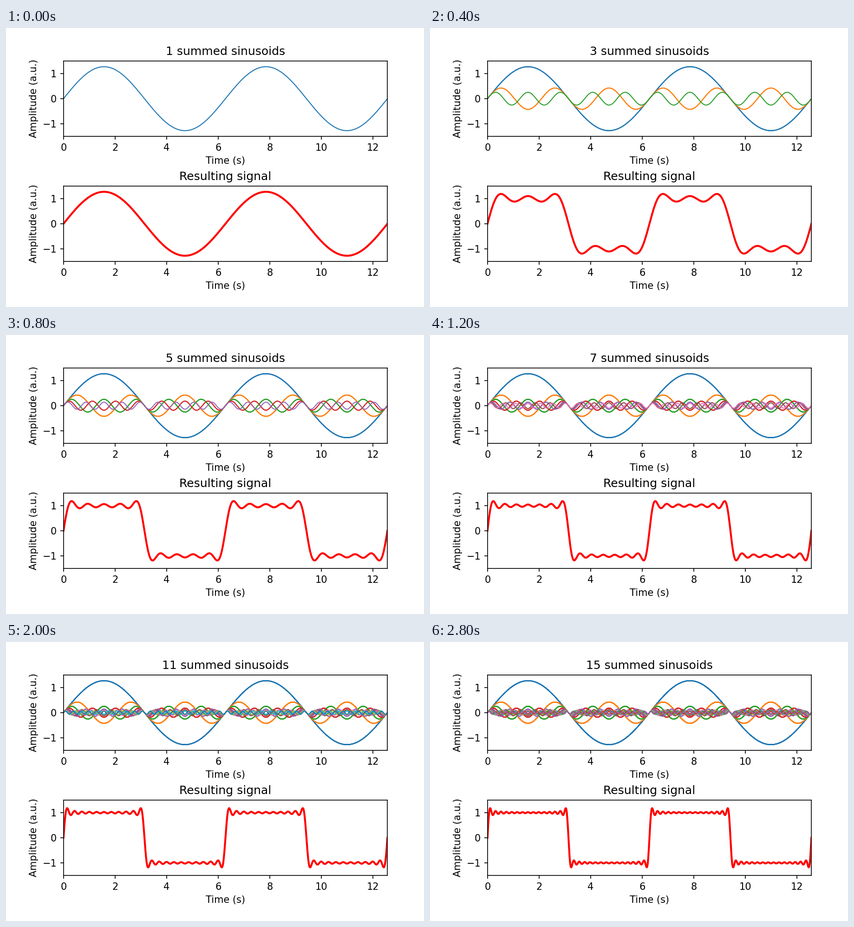
Recreate the animation shown at these times as a matplotlib script. Size 900 by 600 pixels, loop 3000 ms.

```python
import numpy as np
import matplotlib.pyplot as plt
from matplotlib.animation import FuncAnimation

W, H, DPI = 900, 600, 150
COUNT = 15
LEFT, WIDTH, HEIGHT = 123.75, 697.5, 162

fig = plt.figure(figsize=(W / DPI, H / DPI), dpi=DPI, facecolor="white")
t = np.linspace(0, 4 * np.pi, 1000)


def make_axes(top, title):
    ax = fig.add_axes([LEFT / W, 1 - (top + HEIGHT) / H, WIDTH / W, HEIGHT / H])
    ax.set_xlim(0, 4 * np.pi)
    ax.set_ylim(-1.5, 1.5)
    ax.set_yticks([-1, 0, 1])
    ax.set_xlabel("Time (s)")
    ax.set_ylabel("Amplitude (a.u.)")
    return ax, ax.set_title(title)


def harmonic(i):
    n = 2 * i + 1
    return 4 / np.pi * np.sin(n * t) / n


waves = np.array([harmonic(i) for i in range(COUNT)])
sums = np.cumsum(waves, axis=0)

top_ax, top_title = make_axes(71, "1 summed sinusoids")
low_ax, _ = make_axes(340, "Resulting signal")

# Each step plots its whole set again on top of the earlier ones,
# so older curves gain firmer edges.
layers = [
    [top_ax.plot(t, waves[i], color=f"C{i % 10}", lw=1)[0] for i in range(step + 1)]
    for step in range(COUNT)
]
result, = low_ax.plot(t, sums[0], color="red", lw=2)


def update(k):
    for step, layer in enumerate(layers):
        for line in layer:
            line.set_visible(step <= k)
    result.set_ydata(sums[k])
    top_title.set_text(f"{k + 1} summed sinusoids")
    return [result, top_title]


anim = FuncAnimation(fig, update, frames=COUNT, interval=200,
                     init_func=lambda: update(0), repeat=True, repeat_delay=0)
plt.show()
```
